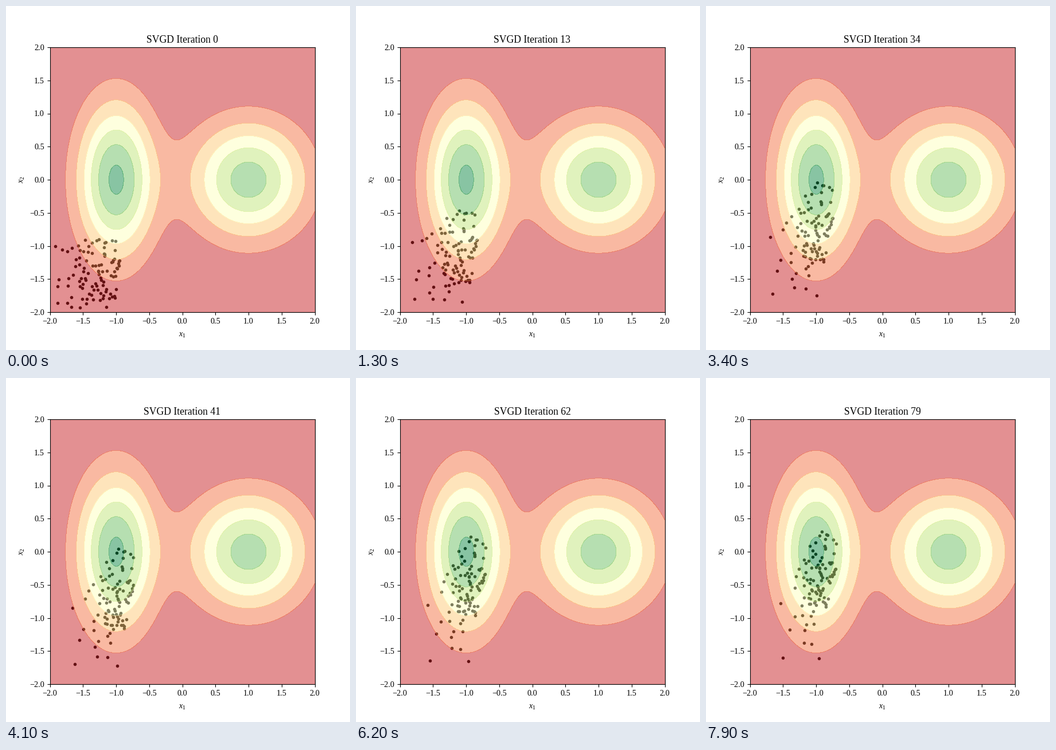
Animation, 600 px wide and 600 px high, one loop 8000 ms. Source, as a matplotlib script:

```python
import numpy as np
import matplotlib.pyplot as plt
from matplotlib.animation import FuncAnimation

plt.rcParams.update({
    "font.family": "Liberation Serif",
    "font.size": 10.3,
    "mathtext.fontset": "custom",
    "mathtext.rm": "Liberation Serif",
    "mathtext.it": "Liberation Serif:italic",
})

FRAMES = 80
COUNT = 99
LAST = FRAMES - 1

# Stragglers at the rim, in stage pixels: start x, start y, end x, end y
STRAGGLERS = np.array([
    (86, 419, 130, 393), (98, 425, 155, 366), (92, 477, 155, 416),
    (90, 489, 146, 439), (90, 518, 134, 488), (107, 518, 172, 440),
    (114, 525, 171, 462), (129, 526, 184, 464), (140, 519, 188, 429),
    (175, 525, 197, 489),
], float)


def gauss(x, y, mx, sx, sy):
    q = ((x - mx) / sx) ** 2 + (y / sy) ** 2
    return np.exp(-q / 2) / (2 * np.pi * sx * sy)


def density(x, y):
    return 0.5 * gauss(x, y, -1, 0.4, 0.8) + 0.5 * gauss(x, y, 1, 0.6, 0.6)


def make_cloud(n):
    """Seeded starts, denser to the right, and where the flow takes them."""
    rng = np.random.default_rng(7)
    x = 106 + 92 * rng.random(n) ** 0.75
    y = rng.uniform(406, 515, n)
    u, v = (x - 150) / 50, (y - 460) / 55
    end_x = 191 + u * (33 - 12 * v)
    end_y = 322 + 62 * v + np.abs(x - 168)
    return np.stack([x, y, end_x, end_y], axis=1)


PATHS = np.vstack([STRAGGLERS, make_cloud(COUNT - len(STRAGGLERS))])
START, END = PATHS[:, :2], PATHS[:, 2:]

# Each coordinate relaxes at a rate set by where the particle starts
x0, y0 = START.T
TAU = np.stack([
    22 + np.maximum(0, 125 - x0),
    np.maximum(30, 35 + 0.42 * (y0 - 405) - 0.25 * (x0 - 150)),
], axis=1)


def positions(step):
    part = (1 - np.exp(-step / TAU)) / (1 - np.exp(-LAST / TAU))
    px, py = (START + (END - START) * part).T
    return (px - 76.5) / 115.5 - 2, 2 - (py - 72) / 115.5


fig, ax = plt.subplots(figsize=(6, 6), dpi=100)
grid = np.linspace(-2, 2, 100)
gx, gy = np.meshgrid(grid, grid)
ax.contourf(gx, gy, density(gx, gy), levels=np.arange(8) * 0.04,
            cmap="RdYlGn", alpha=0.5, zorder=1)
dots, = ax.plot([], [], "k.", zorder=0.5)
ticks = np.arange(-2, 2.1, 0.5)
ax.set(aspect="equal", xlim=(-2, 2), ylim=(-2, 2), xticks=ticks, yticks=ticks)
ax.set_xlabel("$x_1$", fontsize=10, labelpad=8)
ax.set_ylabel("$x_2$", fontsize=10)
title = ax.set_title("", fontsize=12.7)


def update(step):
    dots.set_data(*positions(step))
    title.set_text(f"SVGD Iteration {step}")
    return dots, title


anim = FuncAnimation(fig, update, frames=FRAMES, interval=100, repeat=True, repeat_delay=0)
plt.show()
```
